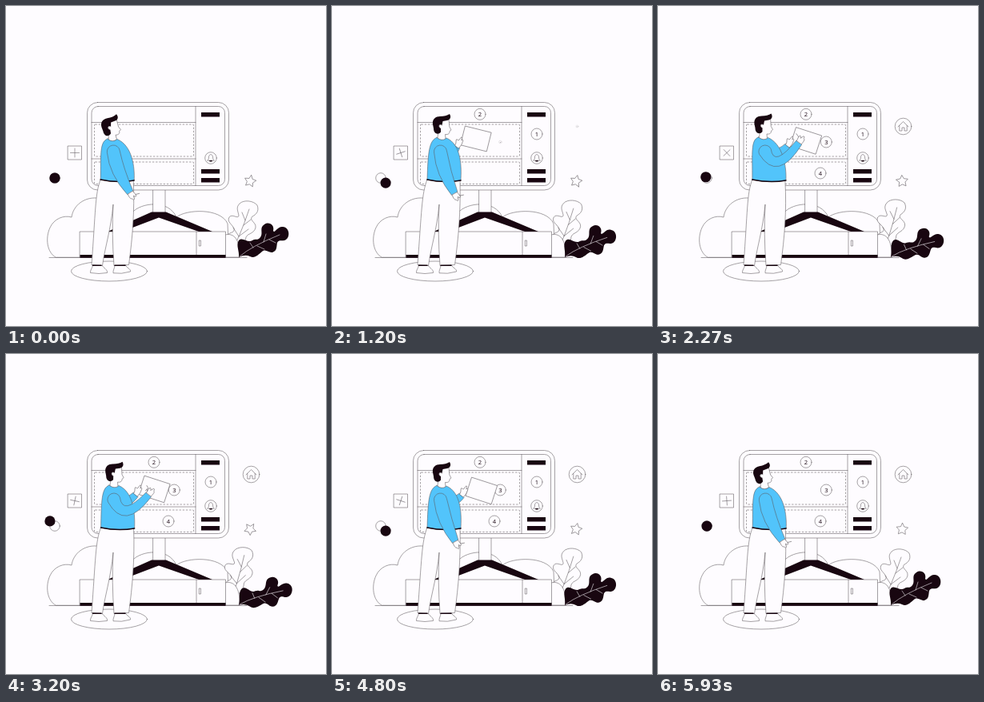
Animation of 400 by 400 pixels, one loop 6 s. Source, as an HTML page:

```html
<!DOCTYPE html>
<html lang="en">
<head>
<meta charset="utf-8">
<title>Planning a layout</title>
<style>
  html, body { margin: 0; width: 100%; height: 100%; overflow: hidden; background: #fefcff; }
  svg { display: block; width: 100vw; height: 100vh; }
  .line { fill: none; stroke: #5c575b; stroke-width: .55; stroke-linecap: round; stroke-linejoin: round; }
  .paper { fill: #fefcff; }
  .ink { fill: #180610; stroke: none; }
  .shirt { fill: #52c4fb; }
  .dash { stroke-dasharray: 2.4 1.8; stroke-linecap: butt; }
  .vein { stroke: #fefcff; }
  .bold { stroke: #180610; }
  text { font: 7.6px "Open Sans", "Noto Sans", sans-serif; text-anchor: middle; fill: #180610; stroke: none; }
</style>
</head>
<body>
<svg viewBox="0 0 400 400" class="line">
  <!-- bushes and leaves -->
  <path class="paper" d="M62 314 C51 308 49 290 55 277 C60 266 72 261 82 264 C84 249 98 239 113 240 C135 240 150 246 158 258 C168 246 203 241 213 264 C225 254 268 252 277 272 Q279 300 274 314 Z"/>
  <g id="paleLeaf">
    <path class="paper" d="M280 306 C275 300 272 292 277 286 C281 282 286 284 285 278 C282 272 276 270 279 264 C283 259 290 267 291 262 C290 256 287 252 292 247 C297 242 309 243 314 249 C317 257 312 261 308 263 C303 268 313 270 312 277 C310 285 302 284 300 289 C299 296 294 300 289 304 Z"/>
    <path d="M279 312 Q292 290 304 254 M291 288 L284 277 M291 288 L303 279 M299 268 L295 258 M297 274 L306 267"/>
  </g>
  <path class="paper" d="M274 286 C284 283 293 291 292 314 H274 Z"/>
  <g id="darkLeaf">
    <path class="ink" d="M291 314 C292 306 287 299 291 293 C296 288 302 297 308 293 C313 290 314 294 318 289 C322 284 316 277 323 273 C329 269 336 274 334 281 C336 285 339 275 346 276 C355 277 355 289 350 292 C346 295 341 291 339 296 C338 301 339 306 333 308 C328 309 325 303 320 307 C315 311 311 316 305 313 Q299 310 291 314 Z"/>
    <path class="vein" d="M292 313 Q307 300 342 286 M309 302 L305 296 M314 300 L323 304 M322 295 L325 285 M329 292 L337 296"/>
  </g>
  <path d="M54 314.500 H301"/>

  <!-- screen -->
  <path class="paper" d="M184 228 H199 V262 H184 Z"/>
  <path class="ink" d="M182 257.500 H200 L258 282 H241 L191 264.500 L145 282 H127 Z"/>
  <rect class="paper" x="101.500" y="120.500" width="177" height="109.500" rx="13"/>
  <rect x="107" y="125.500" width="166.500" height="99" rx="8"/>
  <path d="M237 125.500 V224.500 M107 145.500 H237 M107 191 H237"/>
  <rect class="dash" x="110.500" y="148" width="124" height="40" rx="1"/>
  <rect class="dash" x="110.500" y="195" width="124" height="27.500" rx="1"/>
  <path class="ink" d="M244 133 h23 v5.500 h-23 Z M244 204 h23 v5.500 h-23 Z M244 215 h23 v5.500 h-23 Z"/>
  <circle class="paper" cx="256" cy="190" r="7.300"/>
  <path d="M252 193 Q253.500 192 253.500 189 C253.500 184.500 258.500 184.500 258.500 189 Q258.500 192 260 193 Z"/>
  <path class="ink" d="M254 193 H258 L257.300 194.500 H254.700 Z"/>

  <!-- cabinet -->
  <rect class="paper" x="92.500" y="282" width="182" height="32"/>
  <path d="M151.500 282 V311 M238 282 V311 M153.800 293 h1.700 v7 h-1.700 Z M241.700 293 h1.700 v7 h-1.700 Z"/>
  <path class="ink" d="M92.500 311 H274.500 V314.700 H92.500 Z"/>

  <!-- floating marks -->
  <rect x="77.500" y="175" width="17" height="17"/>
  <path id="cross" d="M80.500 183.500 H91.500 M86 178 V189"/>
  <circle cx="61" cy="215" r="6.300"/>
  <circle id="ball" class="ink" cx="61" cy="215" r="6.600"/>
  <path id="star"/>
  <g id="badges"></g>

  <!-- person -->
  <ellipse class="paper" cx="129" cy="331.500" rx="47.500" ry="12.500"/>
  <g class="paper">
    <path d="M108.500 324 C108 328 105 330 105.500 333.500 Q116 335.500 126.500 333.500 C127 329 122 328 120 324 Z"/>
    <path d="M136 324 C136 328 133.500 330 134 333.800 Q144 335.500 155.500 332 C156 328 151 328 149.500 324 Z"/>
    <path id="pants"/>
  </g>
  <path class="bold" stroke-width="1.500" d="M108.500 324.300 H119 M136 324.300 H149"/>
  <path id="farArm" class="shirt"/>
  <g id="sheet">
    <rect class="paper" x="-16.700" y="-12.200" width="33.400" height="24.400"/>
    <path id="note" pathLength="1" stroke-dasharray="1 1" d="M-10 5 l1.500 -3 l.5 3.500 l1.500 -2.500 l.5 2.500 l2 -2 l.5 2 l3 -1"/>
  </g>
  <path id="farHand" class="paper" d="M0 -3 C4 -3 5 -6 7 -6 C8 -5 7 -3.500 8 -3 L13 -3 C14 -2 12 -1 10 -.5 C12 0 12 1.500 9 2 C6 3.500 3 3 0 3 Z"/>
  <path id="torso" class="shirt"/>
  <path id="belt" class="bold" stroke-width="1.600"/>
  <g id="head">
    <path class="paper" d="M133 156 L132 165 Q137 169 142 166 L141.500 160.500 C146 161 147 159 147 156.500 L149 155 L146.800 151 L146 141 L136 143 Z"/>
    <path class="ink" d="M126 148 C125 141 130 138 135 138 C140 138 144 137 147 135 C149 138 148.500 142 144 143 L138.500 144 L137.500 149 C134 146.500 132.500 151 136 153 L136 157.500 C133 161.500 127 160 127 153 Z"/>
    <path class="paper" d="M137.300 149 C134 146.500 132 151 135.800 153"/>
  </g>
  <g id="hand">
    <path d="M4 1 L7.500 -9"/>
    <path class="paper" d="M0 -3.500 C4 -4 6 -5 8 -4 C9 -3 7 -2 6 -1.500 L10 0 C11 1.500 9 2 8 2 C8 4.500 3 4 0 3.500 Z"/>
  </g>
  <path id="arm" class="shirt"/>
</svg>

<script>
const LOOP = 6000;
const $ = id => document.getElementById(id);
const clamp = x => Math.min(1, Math.max(0, x));
const ease = x => { x = clamp(x); return x * x * (3 - 2 * x); };
const ramp = (t, from, to) => ease((t - from) / (to - from));
const mix = (a, b, k) => a + (b - a) * k;
const set = (id, name, value) => $(id).setAttribute(name, value);
const shape = (id, d) => set(id, 'd', d);
const move = (id, value) => set(id, 'transform', value);

// time, head x y turn, elbow, wrist, far wrist, sheet x y turn
const poses = [
  [0,    -4, 1.5, -10,  138, 207, 155, 233,  144, 203,  166, 186, 0],
  [1200,  0, 0, 0,      139, 209, 153, 234,  156, 176,  180, 166, 14],
  [2270, -5.5, -.5, 0,  147, 212, 176, 171,  162, 175,  185, 168.5, 18],
  [3200, -2, -.5, 1,    147, 213, 178, 176,  162, 176,  185.5, 169, 18],
  [4200, -5, -.5, 0,    148, 214, 180, 180,  162, 175,  185, 168.5, 18],
  [4800,  0, 0, 0,      140, 209, 154, 234,  162, 177,  187, 171, 18],
  [6000, -4, 1.5, -10,  138, 207, 155, 233,  144, 203,  166, 186, 0]
];

const ballKeys = [0, 1, 0, -1, 0, 1, 0];

const house = '<path d="M-6.500 .5 L0 -6 L6.500 .5 M-4.700 -1 V5.500 H-1.500 V1.500 H1.500 V5.500 H4.700 V-1"/>';
const badges = [
  { x: 185, y: 135.3, r: 7, at: 670, label: 2 },
  { x: 256, y: 160, r: 7, at: 720, label: 1 },
  { x: 210.3, y: 170, r: 7, at: 1070, label: 3 },
  { x: 306.5, y: 150.5, r: 10.3, at: 1100 },
  { x: 203, y: 209, r: 7, at: 1270, label: 4 }
];

for (const b of badges) {
  b.node = document.createElementNS('http://www.w3.org/2000/svg', 'g');
  b.node.innerHTML = `<circle class="paper" r="${b.r}"/>` +
    (b.label ? `<text y="2.700">${b.label}</text>` : house);
  $('badges').append(b.node);
}

shape('star', 'M' + Array.from({ length: 10 }, (_, i) => {
  const a = i * Math.PI / 5, r = i % 2 ? 3.9 : 7.6;
  return [305.2 + r * Math.sin(a), 219 - r * Math.cos(a)].map(n => n.toFixed(2));
}).join('L') + 'Z');

function poseAt(t) {
  const i = poses.findIndex((p, n) => n > 0 && t < p[0]);
  const a = poses[i - 1], b = poses[i], k = ramp(t, a[0], b[0]);
  return a.map((v, n) => mix(v, b[n], k)).slice(1);
}

// tapered sleeve through three joints
function sleeve(s, e, w, top, cuff) {
  const side = (p, a, b, h) => {
    const dx = b[0] - a[0], dy = b[1] - a[1], l = Math.hypot(dx, dy) || 1;
    return [p[0] - dy / l * h, p[1] + dx / l * h];
  };
  const mid = (top + cuff) / 2 + 1;
  const line = d => [side(s, s, e, d * top), side(e, s, w, d * mid * 1.35), side(w, e, w, d * cuff)];
  const [a, b, c] = line(1), [x, y, z] = line(-1);
  return `M${c} Q${b} ${a} A${top} ${top} 0 0 1 ${x} Q${y} ${z} Z`;
}

const angle = (a, b) => Math.atan2(b[1] - a[1], b[0] - a[0]) * 180 / Math.PI;

function drawPerson(t) {
  const [dx, dy, turn, ex, ey, wx, wy, fx, fy, px, py, pa] = poseAt(t);
  const hip = dx * .2;
  const left = 119 + hip, right = 161 + hip, waist = 217;

  move('head', `translate(${dx} ${dy}) rotate(${turn} 137 163)`);
  shape('torso', `M${131 + dx} ${164.5 + dy} C${121 + dx} ${168 + dy} ${120 + dx / 3} 184 ${left} ${waist}
    Q140 221.500 ${right} ${waist + 1} C${right + 1} 202 ${162 + dx} ${173 + dy} ${143 + dx} ${165 + dy}
    Q${137 + dx} ${169 + dy} ${131 + dx} ${164.5 + dy} Z`);
  shape('belt', `M${left} ${waist} Q140 221.500 ${right} ${waist + 1}`);
  shape('pants', `M${left} ${waist} C${112 + hip} 234 112 258 107 323.500 L120.500 324.500
    C124 300 131 280 134 248 Q132 285 135 324.500 L153.500 323.500
    C158 290 161 258 ${right - 1} ${waist + 1} Q140 221.500 ${left} ${waist} Z`);

  const shoulder = [135.5 + dx * .3, 182], elbow = [ex, ey], wrist = [wx, wy];
  shape('arm', sleeve(shoulder, elbow, wrist, 8, 4.3));
  move('hand', `translate(${wx} ${wy}) rotate(${angle(elbow, wrist)})`);

  shape('farArm', sleeve([146 + dx, 179], [149, 190], [fx, fy], 6, 4));
  move('farHand', `translate(${fx} ${fy}) rotate(-52)`);

  const size = ramp(t, 500, 1000) * (1 - ramp(t, 5050, 5550));
  move('sheet', `translate(${px} ${py}) rotate(${pa}) scale(${size})`);
  set('sheet', 'visibility', size > .01 ? 'visible' : 'hidden');
  set('note', 'stroke-dashoffset', 1 - clamp((t - 2200) / 1800));
  set('note', 'visibility', t > 2200 && t < 4600 ? 'inherit' : 'hidden');
}

function drawMarks(t) {
  const i = Math.floor(t / 1000);
  const shift = mix(ballKeys[i], ballKeys[i + 1], ease(t / 1000 - i));
  move('ball', `translate(${6.8 * shift} ${6.8 * shift})`);
  move('cross', `rotate(${t / LOOP * 360} 86 183.500)`);
  move('star', `rotate(${12 + t / LOOP * 720} 305.200 219)`);

  const sway = ease(1 - Math.abs(t / 3000 - 1));
  move('darkLeaf', `rotate(${11 * sway} 292 313)`);
  move('paleLeaf', `rotate(${-6 * sway} 278 313)`);

  for (const b of badges) {
    const k = ramp(t, b.at, b.at + 400);
    b.node.setAttribute('transform', `translate(${b.x} ${b.y}) scale(${k})`);
    b.node.setAttribute('visibility', k > 0 ? 'visible' : 'hidden');
  }
}

const start = performance.now();
function frame(now) {
  const t = Math.max(0, now - start) % LOOP;
  drawMarks(t);
  drawPerson(t);
  requestAnimationFrame(frame);
}
frame(start);
</script>
</body>
</html>
```
